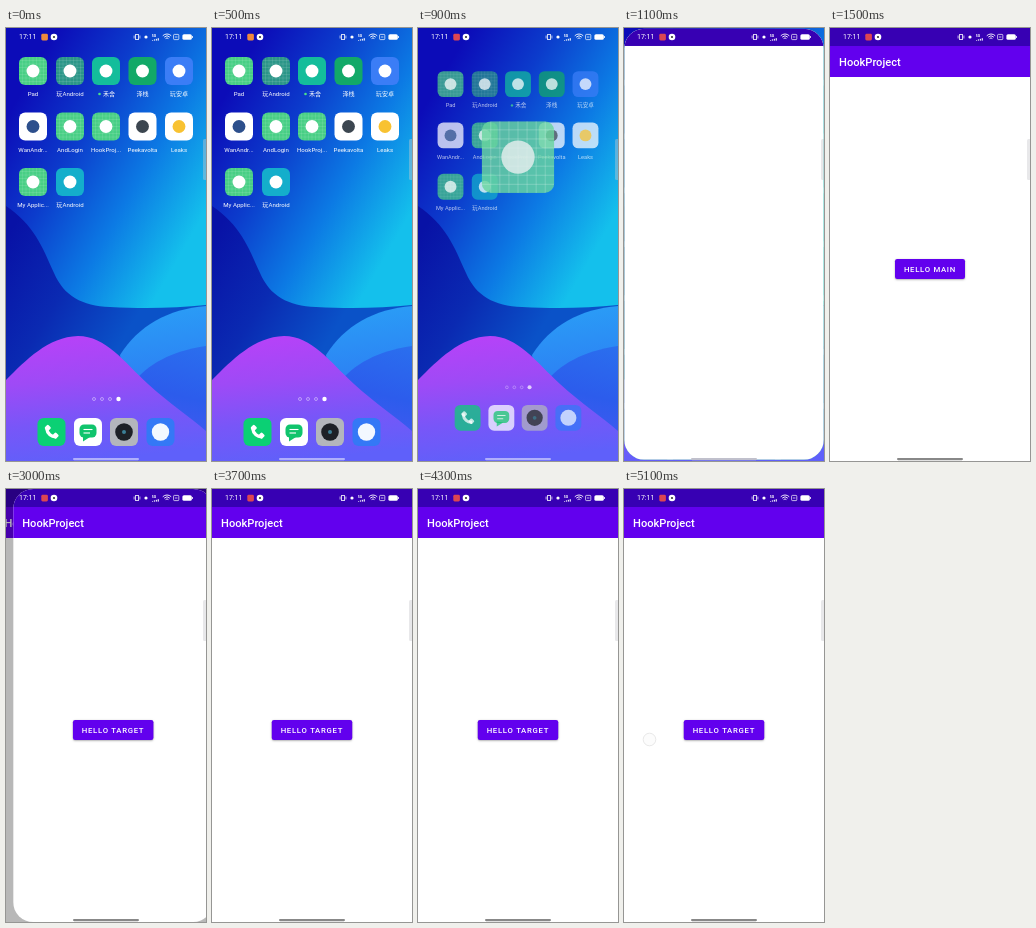
Animation of 200x433 px, one loop 5.3 s. Source, as an HTML page with a canvas:

```html
<!DOCTYPE html>
<html lang="zh">
<head>
<meta charset="utf-8">
<title>HookProject</title>
<style>
  html, body { margin: 0; width: 100%; height: 100%; overflow: hidden; background: #0a22b4; }
  canvas { display: block; width: 200px; height: 433px; }
</style>
</head>
<body>
<canvas id="stage"></canvas>
<script>
const W = 200, H = 433, LOOP = 5300, STEP = 100;
const FONT = 'Roboto, "Noto Sans CJK SC", "Noto Sans CJK", sans-serif';
const PURPLE = '#6200ee', DEEP = '#3700b3', GREEN = '#48cf85';
const COLS = [27, 64, 100, 136.5, 173], ROWS = [43, 98.5, 154], TILE = 28;

const canvas = document.getElementById('stage');
const ctx = canvas.getContext('2d');
const dpr = window.devicePixelRatio || 1;
canvas.width = W * dpr;
canvas.height = H * dpr;

const span = (t, a, b) => Math.min(1, Math.max(0, (t - a) / (b - a)));
const smooth = u => u * u * (3 - 2 * u);
const mix = (a, b, p) => a + (b - a) * p;

function group(fn) { ctx.save(); fn(); ctx.restore(); }

function rect(x, y, w, h, color) {
  ctx.fillStyle = color;
  ctx.fillRect(x, y, w, h);
}

function round(x, y, w, h, r, color) {
  ctx.beginPath();
  ctx.roundRect(x, y, w, h, r);
  if (color) { ctx.fillStyle = color; ctx.fill(); }
}

function disc(x, y, r, color) {
  ctx.beginPath();
  ctx.arc(x, y, r, 0, Math.PI * 2);
  ctx.fillStyle = color;
  ctx.fill();
}

function line(color, width, ...pts) {
  ctx.beginPath();
  pts.forEach(([x, y], i) => i ? ctx.lineTo(x, y) : ctx.moveTo(x, y));
  ctx.strokeStyle = color;
  ctx.lineWidth = width;
  ctx.stroke();
}

function text(str, x, y, size, weight = 400, align = 'left', spacing = 0) {
  ctx.font = `${weight} ${size}px ${FONT}`;
  ctx.textAlign = align;
  ctx.textBaseline = 'alphabetic';
  ctx.letterSpacing = spacing + 'px';
  ctx.fillStyle = '#fff';
  ctx.fillText(str, x, y);
}

function gradient(x0, y0, x1, y1, ...colors) {
  const g = ctx.createLinearGradient(x0, y0, x1, y1);
  colors.forEach((c, i) => g.addColorStop(i / (colors.length - 1), c));
  return g;
}

function shape(path, fill) {
  ctx.fillStyle = fill;
  ctx.fill(new Path2D(path));
}

function wallpaper() {
  rect(0, 0, W, H, gradient(0, 90, 190, 200, '#0c0cb8', '#0c3ccc', '#0c7ae4', '#14c0ec'));
  shape('M0 178C28 197 36 218 48 245C58 268 76 278 104 279C140 281 170 280 200 277V433H0Z',
    gradient(0, 210, 130, 290, '#0812a6', '#0a2ab2', '#0a52c8'));
  shape('M200 278C162 281 132 298 114 327L130 433H200Z',
    gradient(150, 282, 165, 400, '#2a9cf6', '#2c84f4', '#3468f2'));
  shape('M200 318C165 323 142 336 126 356L140 433H200Z',
    gradient(190, 318, 165, 420, '#2a6eee', '#2c5cec', '#4658f2'));
  shape('M0 352C20 332 42 309 72 308C100 308 118 334 142 356C164 376 184 389 200 403V433H0Z',
    gradient(70, 308, 84, 433, '#b642f8', '#9e4af6', '#7856f8', '#5f60fa'));
}

function grid(x, y, size) {
  const ink = 'rgba(255,255,255,.28)';
  for (let i = 1; i < 8; i++) {
    const p = size * i / 8;
    line(ink, size / 75, [x + p, y], [x + p, y + size]);
    line(ink, size / 75, [x, y + p], [x + size, y + p]);
  }
}

// Rounded app tile with an optional construction grid and one plain disc.
function tile(x, y, color, mark, lined, scale = 0.23) {
  group(() => {
    const left = x - TILE / 2, top = y - TILE / 2;
    round(left, top, TILE, TILE, 6.2, color);
    ctx.clip();
    if (lined) grid(left, top, TILE);
    if (mark) disc(x, y, TILE * scale, mark);
  });
}

const APPS = [
  ['Pad', GREEN, '#fff', true],
  ['玩Android', '#2b9688', '#fff', true],
  ['禾舍', '#14bd9b', '#fff'],
  ['泽栈', '#12a968', '#fff'],
  ['玩安卓', '#3b7df6', '#fff'],
  ['WanAndr...', '#fff', '#2d4f8c'],
  ['AndLogin', GREEN, '#fff', true],
  ['HookProj...', GREEN, '#fff', true],
  ['Peekavolta', '#fff', '#3c4650'],
  ['Leaks', '#fff', '#f8c231'],
  ['My Applic...', GREEN, '#fff', true],
  ['玩Android', '#14aecb', '#fff'],
];

function dock() {
  const y = 404;
  tile(45.5, y, '#0bd074');
  group(() => {
    ctx.translate(45.5, y);
    ctx.rotate(-Math.PI / 4);
    ctx.scale(1.25, 1.25);
    ctx.beginPath();
    ctx.arc(4.5, 0, 7, Math.PI * 0.72, Math.PI * 1.28);
    ctx.strokeStyle = '#fff';
    ctx.lineWidth = 2.6;
    ctx.stroke();
    round(-1.8, -6.4, 4, 4, 1, '#fff');
    round(-1.8, 2.4, 4, 4, 1, '#fff');
  });
  tile(82, y, '#fff');
  round(73.5, 396.5, 17, 13, 4.5, '#10c46c');
  shape('M77 408V413.5L84 409Z', '#10c46c');
  line('#fff', 1.1, [77.5, 401.5], [86.5, 401.5]);
  line('#fff', 1.1, [77.5, 405], [84, 405]);
  tile(118, y, '#b3b6bc');
  disc(118, y, 8.8, '#1d2127');
  disc(118, y, 2, '#3b7f96');
  tile(154.5, y, '#3478f6', '#f3f8ff', false, 0.31);
}

function home(t) {
  const u = span(t, 750, 1000), away = 1 - (1 - u) ** 2;
  const s = 1 - 0.09 * away;
  group(() => {
    ctx.globalAlpha = 1 - 0.33 * away;
    ctx.translate(100, 216.5);
    ctx.scale(s, s);
    ctx.translate(-100, -216.5);
    APPS.forEach(([name, color, mark, lined], i) => {
      const x = COLS[i % 5], y = ROWS[Math.floor(i / 5)];
      if (i !== 7 || t <= 800) tile(x, y, color, mark, lined);
      const fresh = i === 2;
      if (fresh) disc(93.5, y + 23, 1.3, '#4be08a');
      text(name, x + (fresh ? 3 : 0), y + 25.2, 6.1, 400, 'center');
    });
    for (let i = 0; i < 3; i++) {
      ctx.beginPath();
      ctx.arc(88 + i * 8, 371, 1.5, 0, Math.PI * 2);
      ctx.strokeStyle = 'rgba(255,255,255,.6)';
      ctx.lineWidth = 0.7;
      ctx.stroke();
    }
    disc(112.5, 371, 2.2, '#fff');
    dock();
  });
}

function page(label, width) {
  rect(0, 0, W, H, '#fff');
  rect(0, 18, W, 31, PURPLE);
  rect(0, 0, W, 18, DEEP);
  text('HookProject', 9, 37.5, 11.1, 500);
  group(() => {
    ctx.shadowColor = 'rgba(0,0,0,.35)';
    ctx.shadowBlur = 2 * dpr;
    ctx.shadowOffsetY = 0.8 * dpr;
    round(100 - width / 2, 231, width, 20, 2.2, PURPLE);
  });
  text(label, 100 - width / 2 + 8.9, 243.8, 7.78, 500, 'left', 0.69);
}

const mainPage = () => page('HELLO MAIN', 70);
const targetPage = () => page('HELLO TARGET', 80.5);

// The tapped icon grows into the blank app window.
function launch(t) {
  const p = smooth(span(t, 795, 1110)), q = p ** 1.65;
  const w = mix(TILE, W, p), h = mix(TILE, H, q);
  const x = 100 - w / 2, cy = mix(ROWS[1], H / 2, p), y = cy - h / 2;
  const size = Math.max(w, h);
  group(() => {
    round(x, y, w, h, p < 1 ? 6 + 14 * p : 0);
    ctx.clip();
    ctx.globalAlpha = mix(0.82, 1, span(t, 900, 1000));
    rect(x, y, w, h, '#6ad6a0');
    grid(100 - size / 2, cy - size / 2, size);
    disc(100, cy, w * 0.23, '#e6eeee');
    ctx.globalAlpha = span(t, 900, 1080);
    rect(x, y, w, h, '#fff');
    ctx.globalAlpha = span(t, 920, 1060);
    rect(x, y - 1, w, 18 * p + 1 - y * q ** 9, DEEP);
  });
}

function slide(t) {
  const left = (1 - span(t, 2700, 3300)) ** 4.8;
  const x = W * left;
  if (left >= 1) return mainPage();
  group(() => {
    ctx.translate(-11 * (1 - left), 0);
    mainPage();
  });
  rect(0, 0, W, H, `rgba(0,0,0,${0.29 * (1 - left)})`);
  group(() => {
    ctx.translate(x, 0);
    if (x > 0.3) {
      round(0, 0, W, H, 20);
      ctx.clip();
    }
    targetPage();
  });
}

function statusBar(t) {
  const c = '#fff';
  text('17:11', 13, 11.4, 7);
  round(35.3, 5.8, 6.6, 6.6, 1.4, t < 800 ? '#f08a3c' : '#dc4652');
  disc(48, 9, 3.3, c);
  disc(48, 9, 1.1, '#333');
  ctx.strokeStyle = c;
  ctx.lineWidth = 0.8;
  ctx.strokeRect(129.6, 6.4, 2.8, 5.2);
  line(c, 0.7, [128.1, 7.5], [128.1, 10.5]);
  line(c, 0.7, [133.9, 7.5], [133.9, 10.5]);
  disc(140, 9, 1.6, c);
  text('5G', 145.8, 8.9, 3.6, 700);
  for (let i = 0; i < 4; i++) rect(146 + i * 1.9, 12 - i * 0.6, 1.1, 0.6 + i * 0.6, c);
  for (const r of [2, 4, 6]) {
    ctx.beginPath();
    ctx.arc(161, 12, r, -Math.PI * 0.75, -Math.PI * 0.25);
    ctx.strokeStyle = c;
    ctx.lineWidth = 0.9;
    ctx.stroke();
  }
  ctx.strokeStyle = c;
  ctx.lineWidth = 0.7;
  round(167.6, 6.4, 5.2, 5.2, 0.8);
  ctx.stroke();
  line(c, 0.7, [169, 9], [171.4, 9]);
  round(176.4, 6.2, 9.4, 5.6, 1.6, c);
  rect(186.2, 8, 0.8, 2, c);
}

function overlay(t) {
  round(197, 111, 5, 41, 1.5, 'rgba(200,200,204,.42)');
  const pill = t < 1000 ? 'rgba(255,255,255,.5)' : t < 1200 ? '#c0c0cc' : '#888';
  round(67, 430, 66, 2.2, 1.1, pill);
  statusBar(t);
}

function touch(t) {
  if (t < 5000) return;
  ctx.beginPath();
  ctx.arc(25.5, 250.5, 6.3, 0, Math.PI * 2);
  ctx.fillStyle = 'rgba(0,0,0,.01)';
  ctx.fill();
  ctx.strokeStyle = '#e2e2e2';
  ctx.lineWidth = 0.8;
  ctx.stroke();
}

function draw(t) {
  ctx.setTransform(dpr, 0, 0, dpr, 0, 0);
  if (t < 1400) {
    wallpaper();
    home(t);
    if (t > 800) launch(t);
  } else if (t < 2700) {
    mainPage();
  } else {
    slide(t);
  }
  touch(t);
  overlay(t);
}

function tick() {
  const t = performance.now() % LOOP;
  draw(Math.floor(t / STEP) * STEP);
  requestAnimationFrame(tick);
}
tick();
</script>
</body>
</html>
```
